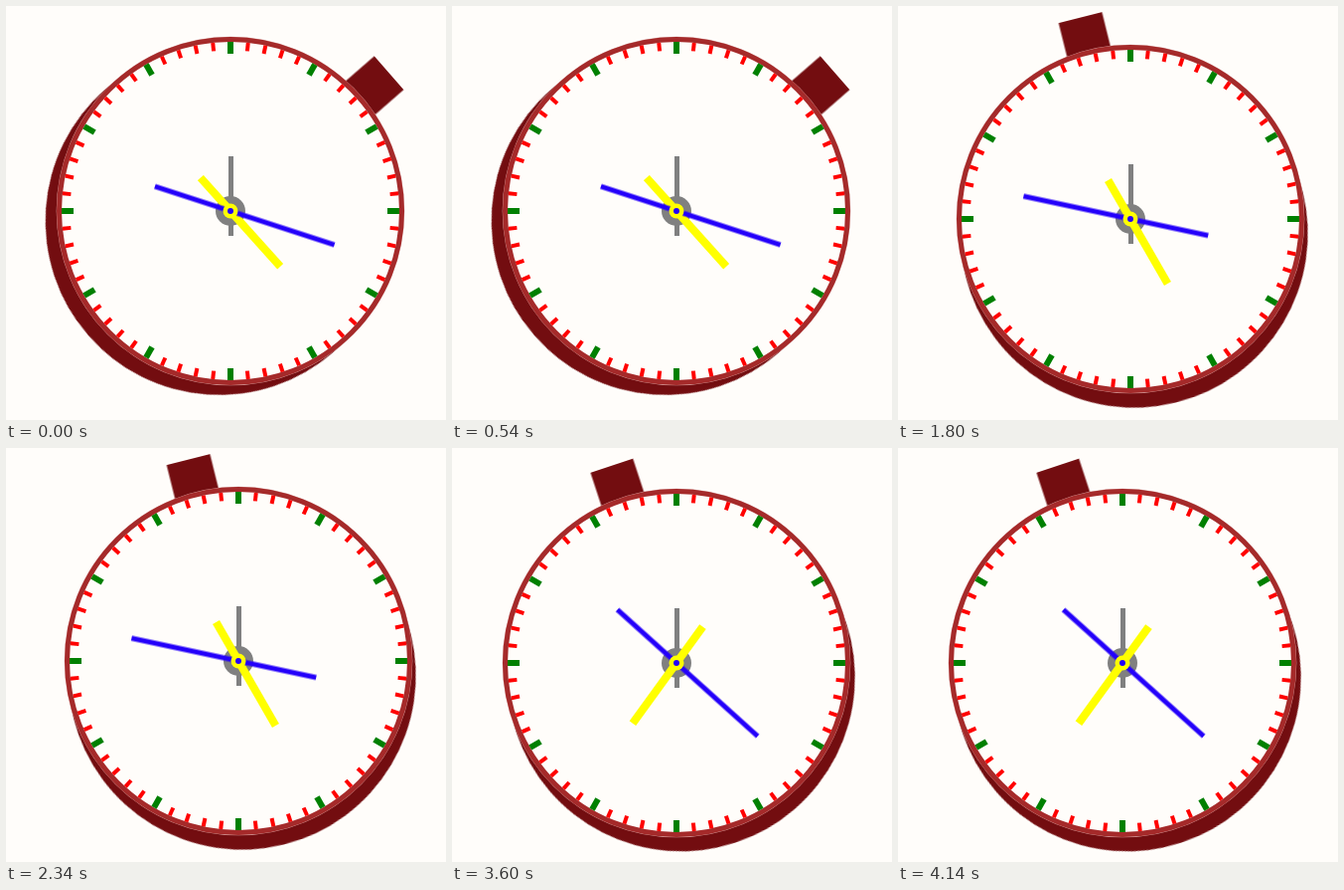
An HTML page that plays this animation: 443 px wide and 416 px high, repeating every 4500 ms.

```html
<!DOCTYPE html>
<html lang="en">
<head>
<meta charset="utf-8">
<title>Pocket watch</title>
<style>
  html, body { margin: 0; width: 100%; height: 100%; overflow: hidden; background: #fffdfa; }
  svg { display: block; width: 443px; height: 416px; }
</style>
</head>
<body>
<svg viewBox="0 0 443 416">
  <g id="watch">
    <g id="case" fill="#730d10">
      <circle cy="15" r="175"/>
      <rect id="knob" x="-22.5" width="45" height="50"/>
    </g>
    <circle r="175.3" fill="#d9a5a3"/>
    <circle r="172.5" fill="#fffdfa" stroke="#a52a2a" stroke-width="5"/>
    <g id="ticks"></g>
    <path d="M.5-55V25" stroke="#808080" stroke-width="5"/>
    <circle r="15" fill="#808080"/>
    <path id="hour" d="M0-75V45" stroke="#ff0" stroke-width="8"/>
    <path id="minute" d="M0-110V80" stroke="#2400fa" stroke-width="5"/>
    <circle r="7.5" fill="#ff0"/>
    <circle r="3" fill="#2400fa"/>
  </g>
</svg>
<script>
  const HOLD = 900;
  const poses = [
    { x: 226, y: 206, tilt: 49,    knob: 211.5, hour: 138, minute: 108 },
    { x: 228, y: 213, tilt: 1.9,   knob: 209,   hour: 210, minute: 198 },
    { x: 234, y: 214, tilt: -14,   knob: 208.6, hour: 150, minute: 282 },
    { x: 224, y: 202, tilt: -50,   knob: 211,   hour: 210, minute: 312 },
    { x: 226, y: 216, tilt: -18.2, knob: 208.7, hour: 216, minute: 132 }
  ];
  const byId = id => document.getElementById(id);

  for (let i = 0; i < 60; i++) {
    const major = i % 5 === 0;
    const tick = document.createElementNS('http://www.w3.org/2000/svg', 'path');
    tick.setAttribute('d', `M0-170V${major ? -158 : -161.5}`);
    tick.setAttribute('stroke', major ? '#008000' : '#f00');
    tick.setAttribute('stroke-width', major ? 6 : 4);
    tick.setAttribute('transform', `rotate(${i * 6})`);
    byId('ticks').append(tick);
  }

  // Each pose is held, then replaced at once.
  function step(id, transform) {
    const frames = [...poses, poses[0]].map((pose, i) => ({
      transform: transform(pose),
      offset: i / poses.length,
      easing: 'step-end'
    }));
    const anim = byId(id).animate(frames, { duration: HOLD * poses.length, iterations: Infinity });
    anim.startTime = start;
  }

  const start = document.timeline.currentTime ?? 0;
  step('watch', p => `translate(${p.x}px, ${p.y}px)`);
  step('case', p => `rotate(${p.tilt}deg)`);
  step('knob', p => `translate(0px, ${-p.knob}px)`);
  step('hour', p => `rotate(${p.hour}deg)`);
  step('minute', p => `rotate(${p.minute}deg)`);
</script>
</body>
</html>
```
